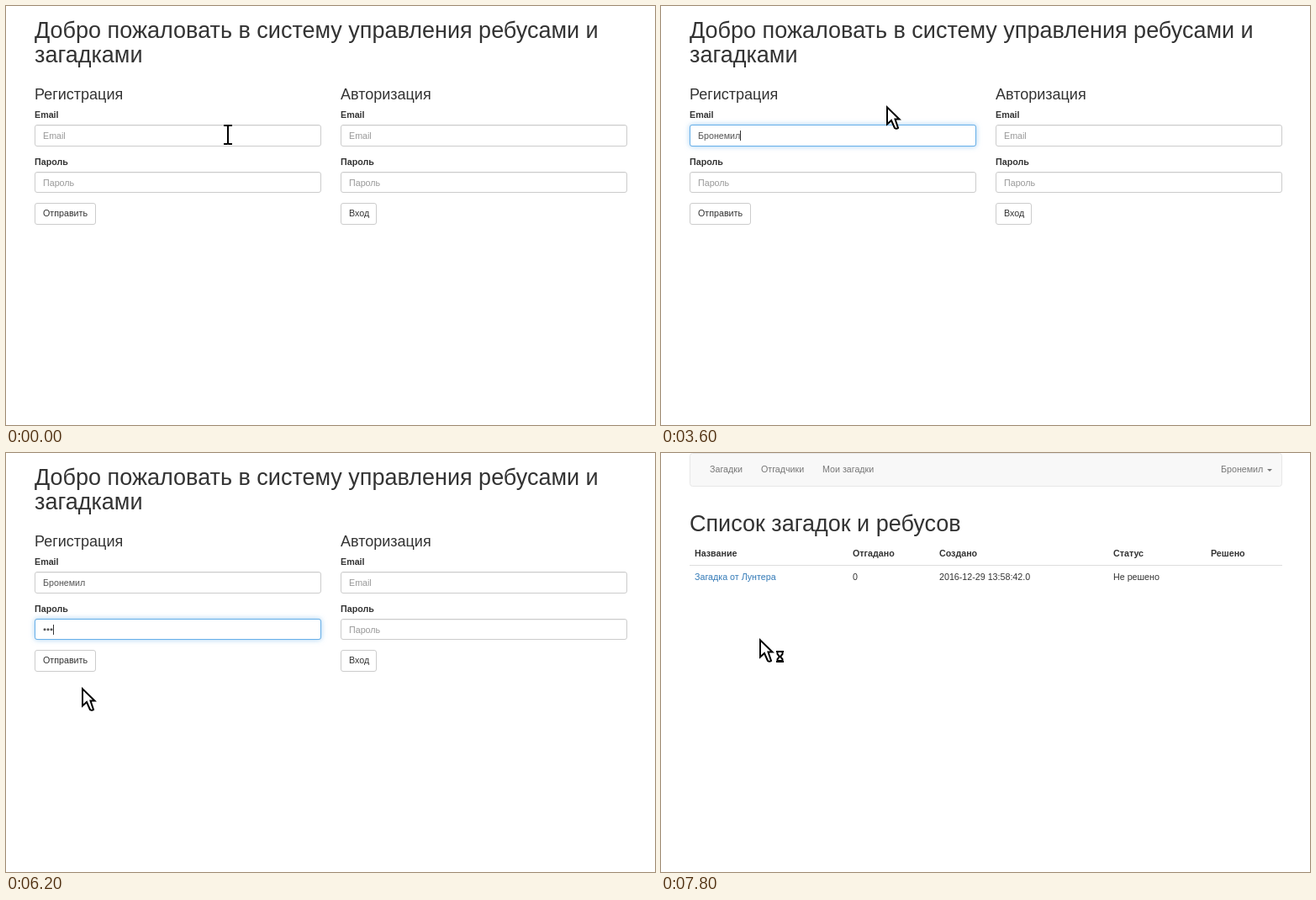
An HTML page for the animation above (8 s loop, 772x498 px).

```html
<!DOCTYPE html>
<html lang="ru">
<head>
<meta charset="utf-8">
<title>Загадки и ребусы</title>
<style>
  html, body { margin: 0; width: 100%; height: 100%; overflow: hidden; background: #fff; }
  svg { display: block; width: 772px; height: 498px; }
  text { font: 10.7px "Liberation Sans", Arial, sans-serif; fill: #333; white-space: pre; }
  .h1 { font-size: 27px; }
  .h3 { font-size: 18px; }
  .b { font-weight: bold; }
  .hint { fill: #999; }
  .value { fill: #555; }
  .nav { fill: #777; }
  .link { fill: #337ab7; }
  .box { fill: #fff; stroke: #ccc; }
  .glow { fill: #fff; stroke: #66afe9; filter: drop-shadow(0 0 3px rgba(102, 175, 233, .6)); }
  .hover { fill: #e6e6e6; stroke: #adadad; }
  .ring { fill: none; stroke: #7ba9dd; stroke-width: 2; }
  .cursor path { fill: #fff; stroke: #000; }
</style>
</head>
<body>
<svg id="stage" viewBox="0 0 772 498"></svg>
<script>
const LOOP = 8000;
const USER = 'Бронемил';

const text = (x, y, s, cls = '', id = '') =>
  `<text x="${x}" y="${y}" class="${cls}" id="${id}">${s}</text>`;
// Pixel-aligned outlined box given by its outer edges
const box = (x, y, w, h, cls = 'box', id = '') =>
  `<rect x="${x + .5}" y="${y + .5}" width="${w - 1}" height="${h - 1}" rx="2.5" class="${cls}" id="${id}"/>`;
const group = (id, body, cls = '') => `<g id="${id}" class="${cls}">${body}</g>`;
const inset = (x, y) => `<path d="M${x + 2} ${y + 1.5}h337" stroke="#f1f1f1"/>`;

function column(x, title, button, width, key) {
  return text(x, 111, title, 'h3') +
    text(x, 133, 'Email', 'b') + box(x, 141, 341, 26) + inset(x, 141) +
    text(x, 189, 'Пароль', 'b') + box(x, 197, 341, 25) + inset(x, 197) +
    (key ? box(x, 141, 341, 26, 'glow', 'glow0') + box(x, 197, 341, 25, 'glow', 'glow1') : '') +
    text(x + 10, 158, 'Email', 'hint', key + 'mail') +
    text(x + 10, 214, 'Пароль', 'hint', key + 'pass') +
    box(x, 234, width, 26) +
    (key ? box(x, 234, width, 26, 'hover', 'hover') +
      `<rect id="ring" class="ring" x="34" y="234" width="73" height="26" rx="2"/>` : '') +
    text(x + 10, 250, button);
}

const dots = [0, 1, 2].map(i =>
  `<circle id="dot${i}" cx="${46 + 4 * i}" cy="209.7" r="1.5" fill="#555"/>`).join('');

const form =
  text(34, 38, 'Добро пожаловать в систему управления ребусами и', 'h1') +
  text(34, 67, 'загадками', 'h1') +
  column(34, 'Регистрация', 'Отправить', 73, 'my') +
  column(398, 'Авторизация', 'Вход', 43, '') +
  text(44, 158, '', 'value', 'typed') + dots +
  '<rect id="caret" width="1" height="12" fill="#333"/>' +
  '<rect id="popup" x="34.5" y="167.5" width="341" height="145" fill="#fff" stroke="#bbb"/>';

const list =
  `<rect x="34.5" y=".5" width="704" height="39" rx="3" fill="#f8f8f8" stroke="#e7e7e7"/>` +
  text(58, 23, 'Загадки', 'nav') + text(119, 23, 'Отгадчики', 'nav') +
  text(192, 23, 'Мои загадки', 'nav') + text(666, 23, USER, 'nav') +
  '<path d="M721 19h6l-3 3z" fill="#777"/>' +
  text(34, 93, 'Список загадок и ребусов', 'h1') +
  [[40, 'Название'], [228, 'Отгадано'], [331, 'Создано'], [538, 'Статус'], [654, 'Решено']]
    .map(([x, s]) => text(x, 123, s, 'b')).join('') +
  '<path d="M34 133.5h705" stroke="#ddd"/>' +
  text(40, 151, 'Загадка от Лунтера', 'link') + text(228, 151, '0') +
  text(331, 151, '2016-12-29 13:58:42.0') + text(538, 151, 'Не решено');

const arrow = '<path stroke-width="2" d="M1 2.4V22.5L6 18L10 27Q12 28.6 14 27L10.5 16.5H15.5Z"/>';
const glass = '<path stroke-width="2" d="M20 16h9M20 28h9M21.5 17v2l2.5 3l-2.5 3v2h6v-2l-2.5-3l2.5-3v-2"/>';
const cursors = {
  beam: '<path style="fill:none" stroke-width="2" d="M0 1H4L5 2L6 1H10M5 2V22M0 23H4L5 22L6 23H10"/>',
  arrow,
  wait: arrow + glass,
  hand: '<path stroke-width="1.3" d="M5 13V3Q5 1 6.7 1Q8.3 1 8.3 3V9Q10 7.5 11.2 9Q13 8 14 9.8Q16 9.5 16.3 11.5V16L14.5 19.5V22.5H6.5V19.5L1.3 13Q.6 11 2.3 10.8Q3.5 11 5 13ZM8.3 9v3.5M11.2 9v3.5M14 9.8v3"/>'
};

const stage = document.getElementById('stage');
stage.innerHTML = group('form', form) + group('list', list) +
  Object.entries(cursors).map(([k, v]) => group(k, v, 'cursor')).join('');

const el = id => document.getElementById(id);
const show = (id, on) => { el(id).style.display = on ? '' : 'none'; };

// Each step changes only the named parts of the previous state
const steps = [
  [0, { cur: 'beam', x: 259, y: 141, typed: 0, dots: 0, focus: -1, caret: 0, popup: 0, hover: 0, ring: 0, page: 'form' }],
  [200, { y: 140 }],
  [600, { focus: 0, caret: 1 }],
  [800, { popup: 1 }],
  [1200, { y: 144, caret: 0 }],
  [1400, { cur: 'arrow', x: 268, y: 118, caret: 1 }],
  [2000, { typed: 1, popup: 0 }],
  [2400, { caret: 0 }],
  [2800, { typed: 2, caret: 1 }],
  [3000, { typed: 3 }],
  [3200, { typed: 5 }],
  [3400, { typed: 6 }],
  [3600, { typed: 8 }],
  [4000, { focus: 1 }],
  [4600, { caret: 0 }],
  [5200, { dots: 1, caret: 1 }],
  [5400, { dots: 2 }],
  [5600, { dots: 3 }],
  [6000, { x: 190, y: 190 }],
  [6200, { x: 90, y: 278 }],
  [6400, { x: 66, y: 264 }],
  [6600, { cur: 'hand', x: 57, y: 249, hover: 1 }],
  [6800, { caret: 0 }],
  [7000, { ring: 1 }],
  [7200, { focus: -1 }],
  [7400, { cur: 'wait', x: 63 }],
  [7600, { x: 92, y: 235 }],
  [7800, { page: 'list', x: 117, y: 220 }]
];
let last = {};
const states = steps.map(([at, change]) => (last = { ...last, ...change, at }));

function draw(s) {
  show('form', s.page === 'form');
  show('list', s.page === 'list');
  for (const k in cursors) show(k, k === s.cur);
  el(s.cur).setAttribute('transform', `translate(${s.x} ${s.y})`);
  el('typed').textContent = USER.slice(0, s.typed);
  show('mymail', !s.typed);
  show('mypass', !s.dots);
  for (let i = 0; i < 3; i++) show('dot' + i, i < s.dots);
  show('glow0', s.focus === 0);
  show('glow1', s.focus === 1);
  for (const k of ['caret', 'popup', 'hover', 'ring']) show(k, s[k]);
  const width = s.focus === 0 ? el('typed').getComputedTextLength() : 4 * s.dots;
  el('caret').setAttribute('x', 44 + Math.round(width));
  el('caret').setAttribute('y', s.focus === 0 ? 148 : 204);
}

let shown = null;
const start = performance.now();
function tick() {
  const t = (performance.now() - start) % LOOP;
  const s = states.findLast(s => s.at <= t);
  if (s !== shown) draw(shown = s);
  requestAnimationFrame(tick);
}
tick();
</script>
</body>
</html>
```
